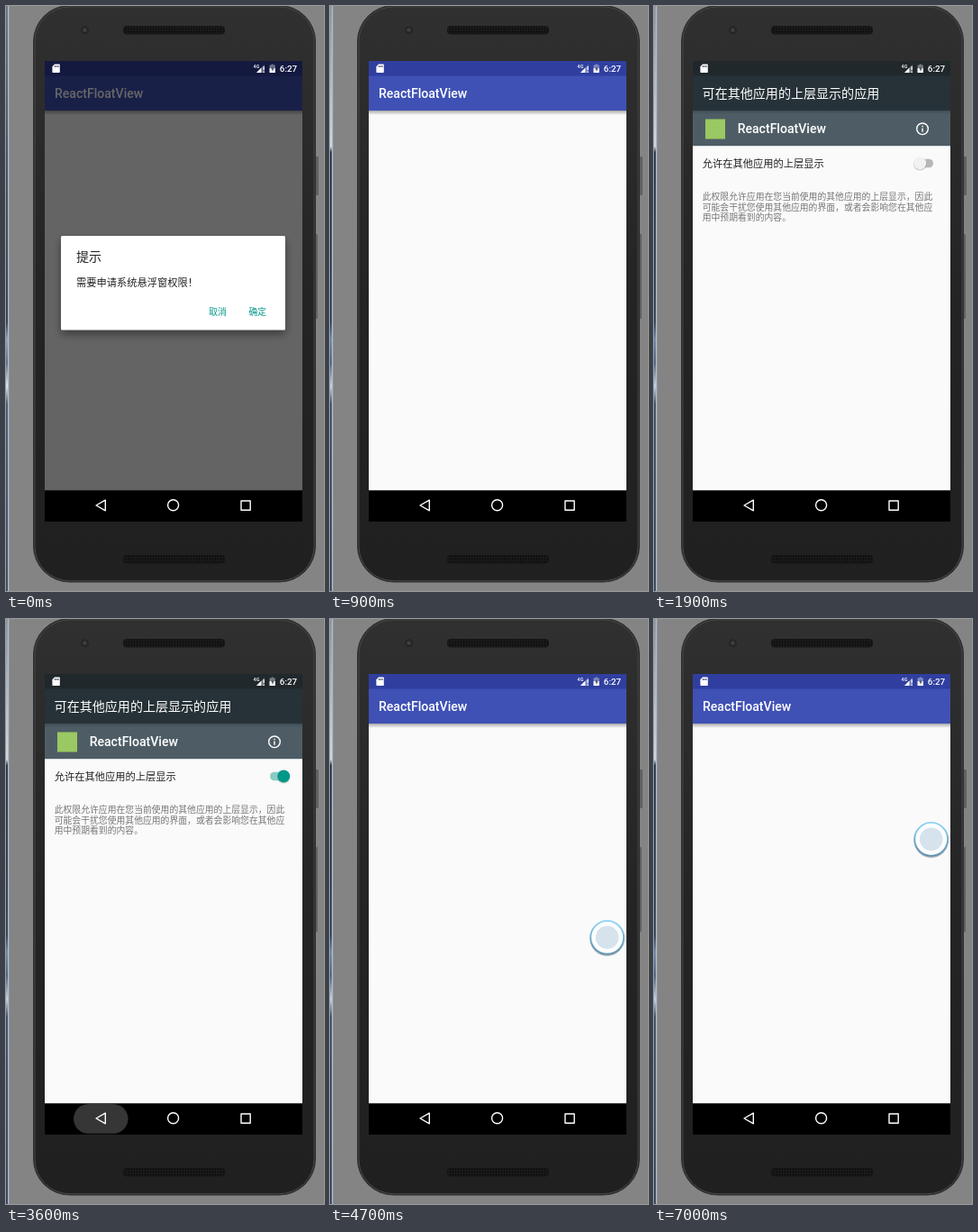
An HTML page that plays this animation: 353 by 649 pixels, repeating every 8 s.

```html
<!DOCTYPE html>
<html lang="zh-CN">
<head>
<meta charset="utf-8">
<title>Floating view demo</title>
<style>
html, body { margin: 0; width: 100%; height: 100%; overflow: hidden; background: #848484; }
svg { display: block; width: 353px; height: 649px; }
text { font-family: Roboto, "Noto Sans CJK SC", "Noto Sans CJK", sans-serif; fill: #212121; }
.h { font-size: 14.06px; }
.b { font-size: 11.25px; }
.s { font-size: 9.84px; }
.m { font-weight: 500; }
.w { fill: #fff; }
.teal { fill: #009688; }
.grey { fill: #757575; }
.icon { fill: none; stroke: #fff; stroke-width: 1.4; }
.card { filter: drop-shadow(0 5px 5px rgba(0,0,0,.4)); }

/* every change is a hard step on a 100 ms grid (1.25%) */
.strip2, .dialog, .window, .details, .row, .off, .on, .thumb, .back, .ball {
  animation: 8s step-end infinite;
}
.strip2 { animation-name: strip; }
.dialog { animation-name: dialog; }
.window { animation-name: window; }
.details { animation-name: details; }
.row { animation-name: row; }
.off { animation-name: off; }
.on { animation-name: on; }
.thumb { animation-name: thumb; }
.back { animation-name: back; transform-origin: 105.2px 554.5px; }
.ball { animation-name: ball; }

@keyframes strip { 0% { opacity: 0 } 6.25%, 100% { opacity: 1 } }
@keyframes dialog { 0% { opacity: 1 } 11.25%, 100% { opacity: 0 } }
@keyframes window {
  0% { opacity: 0; transform: translateY(30px) }
  13.75% { opacity: .55; transform: translateY(30px) }
  15% { opacity: 1; transform: translateY(5px) }
  16.25% { opacity: 1; transform: none }
  56.25% { opacity: 1; transform: translateY(1px) }
  57.5% { opacity: .4; transform: translateY(15px) }
  58.75%, 100% { opacity: 0; transform: none }
}
@keyframes details { 0% { opacity: 0 } 22.5% { opacity: .5 } 23.75%, 100% { opacity: 1 } }
@keyframes row {
  0% { opacity: 0 } 36.25% { opacity: .07 } 37.5% { opacity: .12 }
  38.75% { opacity: .06 } 40%, 100% { opacity: 0 }
}
@keyframes off { 0% { opacity: 1 } 37.5% { opacity: .5 } 38.75%, 100% { opacity: 0 } }
@keyframes on { 0% { opacity: 0 } 37.5% { opacity: .5 } 38.75%, 100% { opacity: 1 } }
@keyframes thumb {
  0% { transform: none } 37.5% { transform: translateX(6px) }
  38.75%, 100% { transform: translateX(13px) }
}
@keyframes back {
  0% { opacity: 0; transform: none }
  45% { opacity: 1; transform: none }
  46.25% { opacity: .9; transform: scaleX(1.2) }
  47.5% { opacity: .6; transform: scaleX(1.2) }
  48.75% { opacity: .25; transform: scaleX(1.2) }
  50%, 100% { opacity: 0; transform: none }
}
@keyframes ball {
  0% { opacity: 0; transform: none }
  56.25% { opacity: 1; transform: none }
  83.75% { opacity: 1; transform: translateY(-27px) }
  85% { opacity: 1; transform: translateY(-62px) }
  86.25% { opacity: 1; transform: translateY(-94px) }
  87.5%, 100% { opacity: 1; transform: translateY(-109px) }
}
</style>
</head>
<body>
<svg viewBox="0 0 353 649">
  <defs>
    <linearGradient id="body" x2="0" y2="1">
      <stop offset="0" stop-color="#303030"/><stop offset=".5" stop-color="#242424"/><stop offset="1" stop-color="#202020"/>
    </linearGradient>
    <linearGradient id="shade" x2="0" y2="1">
      <stop offset="0" stop-opacity=".32"/><stop offset="1" stop-opacity="0"/>
    </linearGradient>
    <linearGradient id="ring" x2="0" y2="1">
      <stop offset="0" stop-color="#8dd3f7"/><stop offset="1" stop-color="#5c8fae"/>
    </linearGradient>
    <linearGradient id="edgeA" x2="0" y2="1">
      <stop offset="0" stop-color="#68778b"/><stop offset=".25" stop-color="#45556b"/>
      <stop offset=".54" stop-color="#33445c"/><stop offset=".57" stop-color="#8fa5c0"/>
      <stop offset=".61" stop-color="#5c7290"/><stop offset=".65" stop-color="#dce6f0"/>
      <stop offset=".68" stop-color="#4a5d77"/><stop offset="1" stop-color="#3f4f66"/>
    </linearGradient>
    <linearGradient id="edgeB" x2="0" y2="1">
      <stop offset="0" stop-color="#8e959e"/><stop offset=".24" stop-color="#d3d8de"/>
      <stop offset=".25" stop-color="#2c3c52"/><stop offset=".54" stop-color="#33465f"/>
      <stop offset=".57" stop-color="#7189a8"/><stop offset=".61" stop-color="#4d6482"/>
      <stop offset=".65" stop-color="#c3d3e4"/><stop offset=".68" stop-color="#40536d"/>
      <stop offset="1" stop-color="#38485f"/>
    </linearGradient>
    <pattern id="mesh" width="3" height="3" patternUnits="userSpaceOnUse">
      <rect width="3" height="3" fill="#1b1b1b"/><circle cx="1.5" cy="1.5" r=".9" fill="#090909"/>
    </pattern>
    <clipPath id="screen"><rect x="43" y="61" width="286" height="511"/></clipPath>
  </defs>

  <rect width="353" height="649" fill="#848484"/>
  <rect width="2" height="649" fill="url(#edgeA)"/>
  <rect class="strip2" width="2" height="649" fill="url(#edgeB)"/>
  <rect x="2" width="1" height="649" fill="#b4bdc8"/>
  <rect x="3" width="1" height="649" fill="#8e959d"/>

  <!-- phone -->
  <g fill="#626262">
    <rect x="342" y="167" width="5" height="43" rx="1"/>
    <rect x="342" y="253" width="4" height="94" rx="1"/>
  </g>
  <rect x="30.5" y="-.5" width="313" height="639.5" rx="40" fill="#262626" stroke="#303030"/>
  <rect x="32" y=".9" width="310" height="636.8" rx="38.5" fill="url(#body)" stroke="#494949"/>
  <circle cx="87.5" cy="26.7" r="4.3" fill="#232323"/>
  <circle cx="87.5" cy="26.7" r="2.4" fill="#3b3e43"/>
  <g fill="url(#mesh)" stroke="#151515">
    <rect x="130.5" y="22.5" width="112" height="8.5" rx="3"/>
    <rect x="130.5" y="609.5" width="112" height="8.5" rx="3"/>
  </g>

  <g clip-path="url(#screen)">
    <!-- app -->
    <rect x="43" y="61" width="287" height="511" fill="#000"/>
    <rect x="43" y="77" width="287" height="460.3" fill="#fafafa"/>
    <rect x="43" y="61" width="287" height="17" fill="#303f9f"/>
    <rect x="43" y="77.5" width="287" height="38.5" fill="#3f51b5"/>
    <rect x="43" y="116" width="287" height="5" fill="url(#shade)"/>
    <text class="h m w" x="54" y="102.3">ReactFloatView</text>

    <g class="dialog">
      <rect x="43" y="61" width="287" height="477" fill-opacity=".6"/>
      <rect class="card" x="61" y="255" width="249" height="104.5" rx="1.5" fill="#fff"/>
      <text class="h" x="78" y="282.5">提示</text>
      <text class="b" x="78" y="311">需要申请系统悬浮窗权限！</text>
      <text class="s teal" x="225.3" y="343">取消</text>
      <text class="s teal" x="269.5" y="343">确定</text>
    </g>

    <!-- permission settings -->
    <g class="window">
      <rect x="43" y="61" width="287" height="511"/>
      <rect x="43" y="77" width="287" height="460.3" fill="#fafafa"/>
      <rect x="43" y="61" width="287" height="17" fill="#20282c"/>
      <rect x="43" y="77.5" width="287" height="39" fill="#263238"/>
      <text class="h m w" x="53.6" y="102">可在其他应用的上层显示的应用</text>
      <g class="details">
        <rect x="43" y="116" width="287" height="39.2" fill="#4e5d65"/>
        <rect x="43" y="116" width="287" height="4" fill="url(#shade)" opacity=".6"/>
        <rect x="57" y="125.5" width="22" height="22" fill="#9ac862"/>
        <text class="h m w" x="92.7" y="141.4">ReactFloatView</text>
        <circle class="icon" cx="298" cy="136.3" r="6.3"/>
        <path d="M297.3 132.8h1.4v1.4h-1.4zM297.3 135.5h1.4v4.2h-1.4z" fill="#fff"/>
        <rect class="row" x="43" y="156" width="287" height="37"/>
        <text class="b" x="53.7" y="178.5">允许在其他应用的上层显示</text>
        <rect class="off" x="291" y="169.7" width="19" height="9.6" rx="4.8" fill="#b7b7b7"/>
        <rect class="on" x="293" y="169.7" width="19" height="9.6" rx="4.8" fill="#8accc5"/>
        <g class="thumb">
          <circle cx="295.2" cy="175.3" r="7.3" fill-opacity=".2"/>
          <circle cx="295.2" cy="174.4" r="7" fill="#f1f1f1"/>
          <circle class="on" cx="295.2" cy="174.4" r="7" fill="#009688"/>
        </g>
        <text class="s grey" x="53.7" y="215.3">此权限允许应用在您当前使用的其他应用的上层显示，因此</text>
        <text class="s grey" x="53.7" y="226.8">可能会干扰您使用其他应用的界面，或者会影响您在其他应</text>
        <text class="s grey" x="53.7" y="238.2">用中预期看到的内容。</text>
      </g>
    </g>

    <!-- floating ball -->
    <g class="ball">
      <circle cx="307.7" cy="354.6" r="19.3" fill="#2d4a5c" fill-opacity=".4"/>
      <circle cx="307.7" cy="353.3" r="18.4" fill="#fbfdfe" stroke="url(#ring)" stroke-width="1.8"/>
      <circle cx="307.7" cy="353.3" r="12.8" fill="#d6e3ed"/>
    </g>

    <!-- status bar -->
    <g fill="#fff">
      <path d="M54 64.5h5q.8 0 .8.8v8q0 .8-.8.8h-6.8q-.8 0-.8-.8V67.2z"/>
      <path d="M54 66h1v2h-1zM55.8 66h1v2h-1zM57.6 66h1v2h-1z" fill="#444b6b"/>
      <text class="m w" x="274.6" y="69" font-size="5.4">4G</text>
      <path d="M287 65v9h-9z" fill-opacity=".35"/>
      <path d="M283.4 68.6v5.4H278z"/>
      <path d="M285.6 67h1.2v4h-1.2zM285.6 72.4h1.2v1.6h-1.2z"/>
      <path d="M294.6 64.6h2.2v1h2v8.4h-6.2v-8.4h2z" fill-opacity=".4"/>
      <path d="M292.6 69h6.2v5h-6.2z"/>
      <path d="M296.4 66.5l-2.2 3.7h1.3v2.8l2.2-3.8h-1.3z" fill="#444b6b"/>
      <text class="s m w" x="303.8" y="73">6:27</text>
    </g>

    <!-- navigation bar -->
    <rect class="back" x="75" y="538" width="60.5" height="33" rx="16.5" fill="#363636"/>
    <g class="icon" stroke-linejoin="round">
      <path d="M100 554l10.3-5.8v11.6z"/>
      <circle cx="185.6" cy="553.8" r="6"/>
      <rect x="261" y="549" width="10.2" height="10.2"/>
    </g>
  </g>
</svg>
</body>
</html>
```
